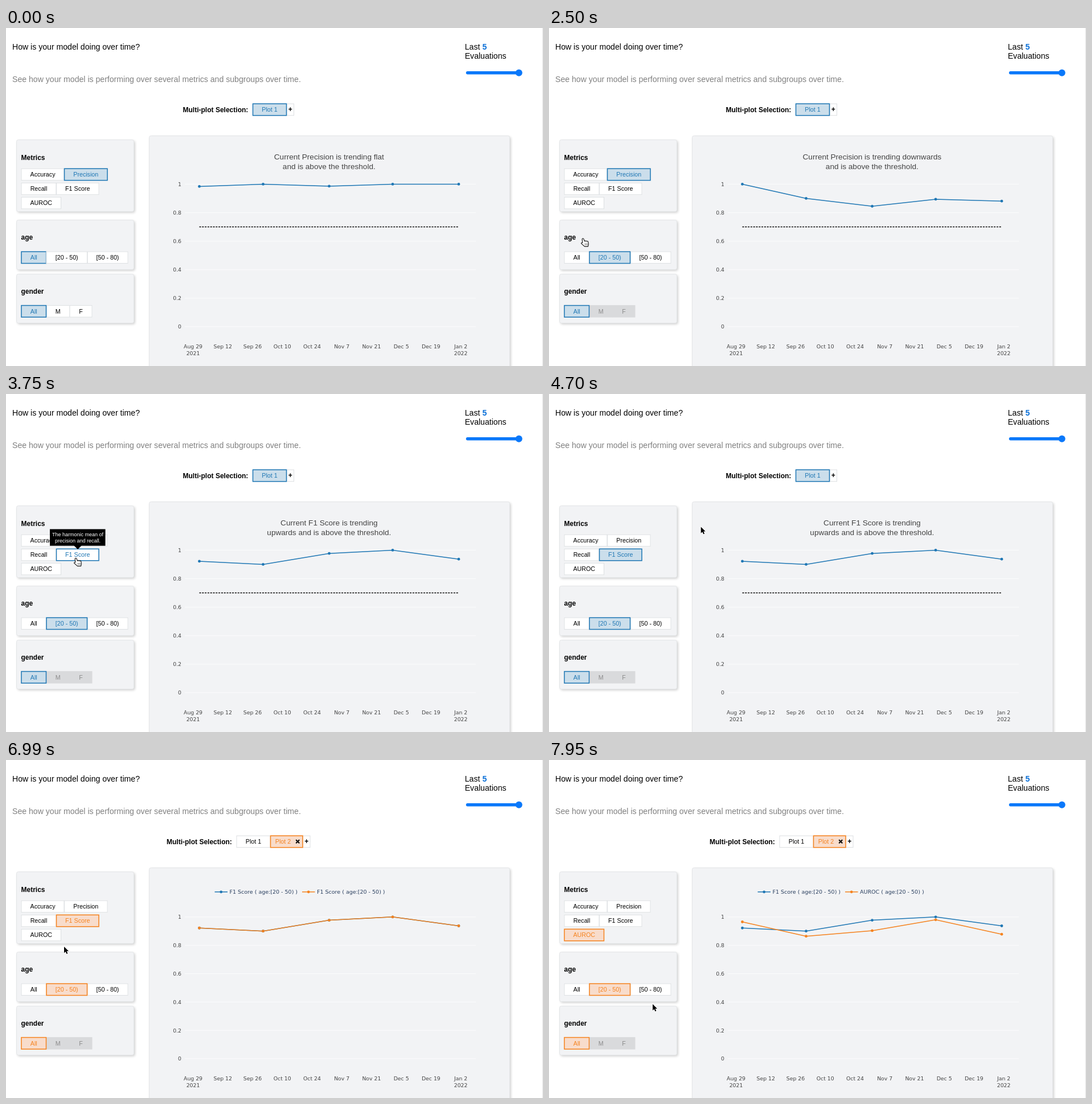
An HTML page with a canvas that plays this animation: 943x594 px, repeating every 8 s.

```html
<!DOCTYPE html>
<html lang="en">
<head>
<meta charset="utf-8">
<title>Model performance over time</title>
<style>
html, body { margin: 0; width: 100%; height: 100%; overflow: hidden; background: #fff; }
canvas { display: block; width: 943px; height: 594px; }
</style>
</head>
<body>
<canvas id="stage"></canvas>
<script>
const W = 943, H = 594, LOOP = 8000;
const SANS = '"Liberation Sans", Arial, sans-serif';
const WIDE = '"DejaVu Sans", Verdana, sans-serif';
const BLUE = '#1f77b4', ORANGE = '#f5831f', PANEL = '#f2f3f5';
const TINT = { [BLUE]: '#cbdeeb', [ORANGE]: '#f8dccb' };

const canvas = document.getElementById('stage');
const ctx = canvas.getContext('2d');
const dpr = window.devicePixelRatio || 1;
canvas.width = W * dpr;
canvas.height = H * dpr;

// Moments of the clicks and hovers, in ms
const CLICK = { age: 1500, f1: 3480, plus: 5900, auroc: 7400 };
const HOVER = { f1: [3150, 4230], auroc: [7180, 7560] };

const SERIES = {
  all: [0.984, 1, 0.986, 1, 1],
  young: [1, 0.9, 0.845, 0.894, 0.881],
  f1: [0.922, 0.9, 0.977, 1, 0.937],
  auroc: [0.965, 0.864, 0.903, 0.98, 0.878]
};
const POINT_X = [339.5, 451.5, 567.5, 679, 795];
const DATES = ['Aug 29', 'Sep 12', 'Sep 26', 'Oct 10', 'Oct 24', 'Nov 7', 'Nov 21', 'Dec 5', 'Dec 19', 'Jan 2'];

// Pointer stops: time, x, y, hand shape
const STOPS = [
  [700, 150, 545, 0], [1040, 117.5, 398.5, 1], [1760, 117.5, 398.5, 1],
  [2480, 60, 369.5, 1], [2620, 60, 369.5, 1], [3200, 123, 288, 1], [4150, 123, 288, 1],
  [4260, 135, 280, 0], [5380, 520.5, 144, 0], [5520, 520.5, 144, 0],
  [5760, 497, 141, 1], [6100, 497, 141, 0], [6950, 102, 328, 0], [7030, 102, 328, 0],
  [7200, 62, 306, 1], [7480, 62, 306, 0], [7900, 182, 429, 0], [8000, 182, 429, 0]
];
const HAND = new Path2D('M-1.8 1.4Q-.6-.6 .8 1L2.4 5.2Q3.6 4 4.6 5.2Q5.8 4.2 6.8 5.4Q8.2 4.8 8.8 6.4L9.4 10.4L8.6 14.4H2.4L-3.4 9.2Q-3.4 7.2-1.2 8Z');
const ARROW = new Path2D('M0 0V11.2L2.6 8.8L4.4 12.8L6.4 12L4.6 8H8Z');

const within = (t, [a, b]) => t >= a && t < b;

function text(str, x, y, size, color = '#000', align = 'left', weight = 'normal', family = SANS) {
  ctx.font = `${weight} ${size}px ${family}`;
  ctx.textAlign = align;
  ctx.fillStyle = color;
  ctx.fillText(str, x, y);
}

function line(x1, y1, x2, y2, color, width) {
  ctx.strokeStyle = color;
  ctx.lineWidth = width;
  ctx.beginPath();
  ctx.moveTo(x1, y1);
  ctx.lineTo(x2, y2);
  ctx.stroke();
}

function dot(x, y, r, color) {
  ctx.fillStyle = color;
  ctx.beginPath();
  ctx.arc(x, y, r, 0, 7);
  ctx.fill();
}

function card(x, y, w, h) {
  ctx.save();
  ctx.shadowColor = 'rgba(0,0,0,0.2)';
  ctx.shadowBlur = 4 * dpr;
  ctx.shadowOffsetX = ctx.shadowOffsetY = 2 * dpr;
  ctx.fillStyle = PANEL;
  ctx.beginPath();
  ctx.roundRect(x, y, w, h, 3);
  ctx.fill();
  ctx.restore();
  ctx.strokeStyle = '#e3e5e7';
  ctx.lineWidth = 1;
  ctx.stroke();
}

// state: '' plain, 'on' selected, 'over' hovered, 'off' disabled
function button(label, x, y, w, state, accent, labelX = x + w / 2) {
  const h = 21.5, lit = state === 'on' || state === 'over';
  ctx.fillStyle = state === 'on' ? TINT[accent] : state === 'off' ? '#d9dadc' : '#fff';
  ctx.fillRect(x, y, w, h);
  if (state !== 'off') {
    ctx.strokeStyle = lit ? accent : '#dcdfe2';
    ctx.lineWidth = lit ? 1.5 : 1;
    ctx.strokeRect(x + 0.5, y + 0.5, w - 1, h - 1);
  }
  text(label, labelX, y + 14.4, 10.7, lit ? accent : state === 'off' ? '#8b8b8b' : '#000', 'center');
}

function header() {
  text('How is your model doing over time?', 11, 38, 14.1);
  text('See how your model is performing over several metrics and subgroups over time.', 11, 95.3, 14.1, '#808080');
  text('Last', 805.7, 38, 14.1);
  text('5', 836.6, 38, 14.1, '#0b70d8', 'left', 'bold');
  text('Evaluations', 805.7, 54, 14.1);
  ctx.lineCap = 'round';
  line(810.5, 78.8, 900, 78.8, '#0a78fa', 5.4);
  ctx.lineCap = 'butt';
  dot(900.7, 78.8, 6, '#0a78fa');
  line(942.5, 0, 942.5, H, '#e2e2e2', 1);
}

function plotPicker(two) {
  const x = two ? 282 : 310.5;
  text('Multi-plot Selection:', x, 147.5, 12.03, '#000', 'left', 'bold');
  const plusX = two ? 521 : 492.5;
  button('', plusX, 132.7, 13.5, '');
  text('+', plusX + 6.7, 147.3, 12, '#000', 'center', 'bold');
  if (!two) {
    button('Plot 1', 433, 132.7, 60, 'on', BLUE);
    return;
  }
  button('Plot 1', 404.5, 132.7, 60, '');
  button('Plot 2', 464, 132.7, 57.5, 'on', ORANGE, 486.5);
  line(509.2, 140.2, 515.2, 146.2, '#000', 2);
  line(515.2, 140.2, 509.2, 146.2, '#000', 2);
}

function sidebar(t, accent) {
  const metric = t < CLICK.f1 ? 'Precision' : t < CLICK.auroc ? 'F1 Score' : 'AUROC';
  const over = within(t, HOVER.f1) ? 'F1 Score' : within(t, HOVER.auroc) ? 'AUROC' : '';
  const young = t >= CLICK.age;
  const title = (s, y) => text(s, 26.5, y, 12, '#000', 'left', 'bold');
  const item = (s, x, y, w) => button(s, x, y, w, s === over ? 'over' : s === metric ? 'on' : '', accent);

  card(18.5, 196.5, 206, 126);
  title('Metrics', 231.5);
  item('Accuracy', 26.5, 246.7, 76);
  item('Precision', 102, 246.7, 76.5);
  item('Recall', 26.5, 271.8, 62);
  item('F1 Score', 88, 271.8, 75.5);
  item('AUROC', 26.5, 296.8, 70.5);

  card(18.5, 337.5, 206, 87);
  title('age', 372);
  button('All', 26.5, 392.6, 44.5, young ? '' : 'on', accent);
  button('[50 - 80)', 142.5, 392.6, 72, '');
  button('[20 - 50)', 70.5, 392.6, 72.5, young ? 'on' : '', accent);

  card(18.5, 432.5, 206, 86);
  title('gender', 466.5);
  button('M', 70.5, 487.1, 41.5, young ? 'off' : '');
  button('F', 111.5, 487.1, 40, young ? 'off' : '');
  button('All', 26.5, 487.1, 44.5, 'on', accent);
}

function plot(values, color, yOf) {
  ctx.strokeStyle = color;
  ctx.lineWidth = 1.5;
  ctx.beginPath();
  values.forEach((v, i) => ctx.lineTo(POINT_X[i], yOf(v)));
  ctx.stroke();
  values.forEach((v, i) => dot(POINT_X[i], yOf(v), 2.4, color));
}

function legend(label, x, color) {
  line(x, 231.8, x + 22.5, 231.8, color, 1.5);
  dot(x + 11.2, 231.8, 2.4, color);
  text(label + ' ( age:[20 - 50) )', x + 26, 235.3, 9.5, '#2a3f5f', 'left', 'normal', WIDE);
}

function chart(t, two) {
  card(251.5, 189.5, 633, 420);
  const top = two ? 275.8 : 274.4;
  const yOf = v => 525 - v * (525 - top);
  for (let i = 0; i <= 5; i++) {
    const y = yOf(i / 5);
    line(314, y, 825, y, '#fcfcfd', 1);
    text(String(i / 5), 308, y + 3.4, 9.3, '#444', 'right', 'normal', WIDE);
  }
  DATES.forEach((d, i) => {
    const x = 328.5 + i * 52.23;
    text(d, x, 563.4, 9.3, '#444', 'center', 'normal', WIDE);
    if (i % 9 === 0) text(i ? '2022' : '2021', x, 575.3, 9.3, '#444', 'center', 'normal', WIDE);
  });

  if (two) {
    const auroc = t >= CLICK.auroc;
    legend('F1 Score', 366.5, BLUE);
    legend(auroc ? 'AUROC' : 'F1 Score', 520, ORANGE);
    plot(SERIES.f1, BLUE, yOf);
    plot(auroc ? SERIES.auroc : SERIES.f1, ORANGE, yOf);
    return;
  }

  const [a, b, values] =
    t < CLICK.age ? ['Current Precision is trending flat', 'and is above the threshold.', SERIES.all] :
    t < CLICK.f1 ? ['Current Precision is trending downwards', 'and is above the threshold.', SERIES.young] :
    ['Current F1 Score is trending', 'upwards and is above the threshold.', SERIES.f1];
  text(a, 567.3, 230.8, 13.57, '#444', 'center');
  text(b, 567.3, 248.2, 13.57, '#444', 'center');
  ctx.setLineDash([3, 1.8]);
  line(339.5, 349.5, 795, 349.5, '#000', 1.6);
  ctx.setLineDash([]);
  plot(values, BLUE, yOf);
}

function tooltip() {
  ctx.fillStyle = '#000';
  ctx.fillRect(77, 237.5, 97.5, 29.2);
  ctx.beginPath();
  ctx.moveTo(119, 266);
  ctx.lineTo(133, 266);
  ctx.lineTo(126, 273);
  ctx.fill();
  text('The harmonic mean of', 126, 249.5, 9, '#fff', 'center');
  text('precision and recall.', 126, 260.5, 9, '#fff', 'center');
}

function pointer(t) {
  const i = STOPS.findIndex(s => s[0] > t);
  if (i < 1) return;
  const [t0, x0, y0, hand] = STOPS[i - 1], [t1, x1, y1] = STOPS[i];
  const p = (t - t0) / (t1 - t0), k = p * p * (3 - 2 * p);
  ctx.save();
  ctx.translate(x0 + (x1 - x0) * k, y0 + (y1 - y0) * k);
  ctx.lineJoin = 'round';
  if (hand) {
    ctx.fillStyle = '#fff';
    ctx.strokeStyle = '#111';
    ctx.lineWidth = 1.1;
    ctx.fill(HAND);
    ctx.stroke(HAND);
    for (const x of [3.2, 5.2, 7.2]) line(x, 9, x + 0.2, 12, '#333', 0.7);
  } else {
    ctx.strokeStyle = '#fff';
    ctx.lineWidth = 1.8;
    ctx.stroke(ARROW);
    ctx.fillStyle = '#000';
    ctx.fill(ARROW);
  }
  ctx.restore();
}

function draw(t) {
  const two = t >= CLICK.plus;
  ctx.setTransform(dpr, 0, 0, dpr, 0, 0);
  ctx.fillStyle = '#fff';
  ctx.fillRect(0, 0, W, H);
  header();
  plotPicker(two);
  sidebar(t, two ? ORANGE : BLUE);
  chart(t, two);
  if (within(t, HOVER.f1)) tooltip();
  pointer(t);
}

let start;
function tick(now) {
  if (start === undefined) start = now;
  draw((now - start) % LOOP);
  requestAnimationFrame(tick);
}
draw(0);
requestAnimationFrame(tick);
</script>
</body>
</html>
```
